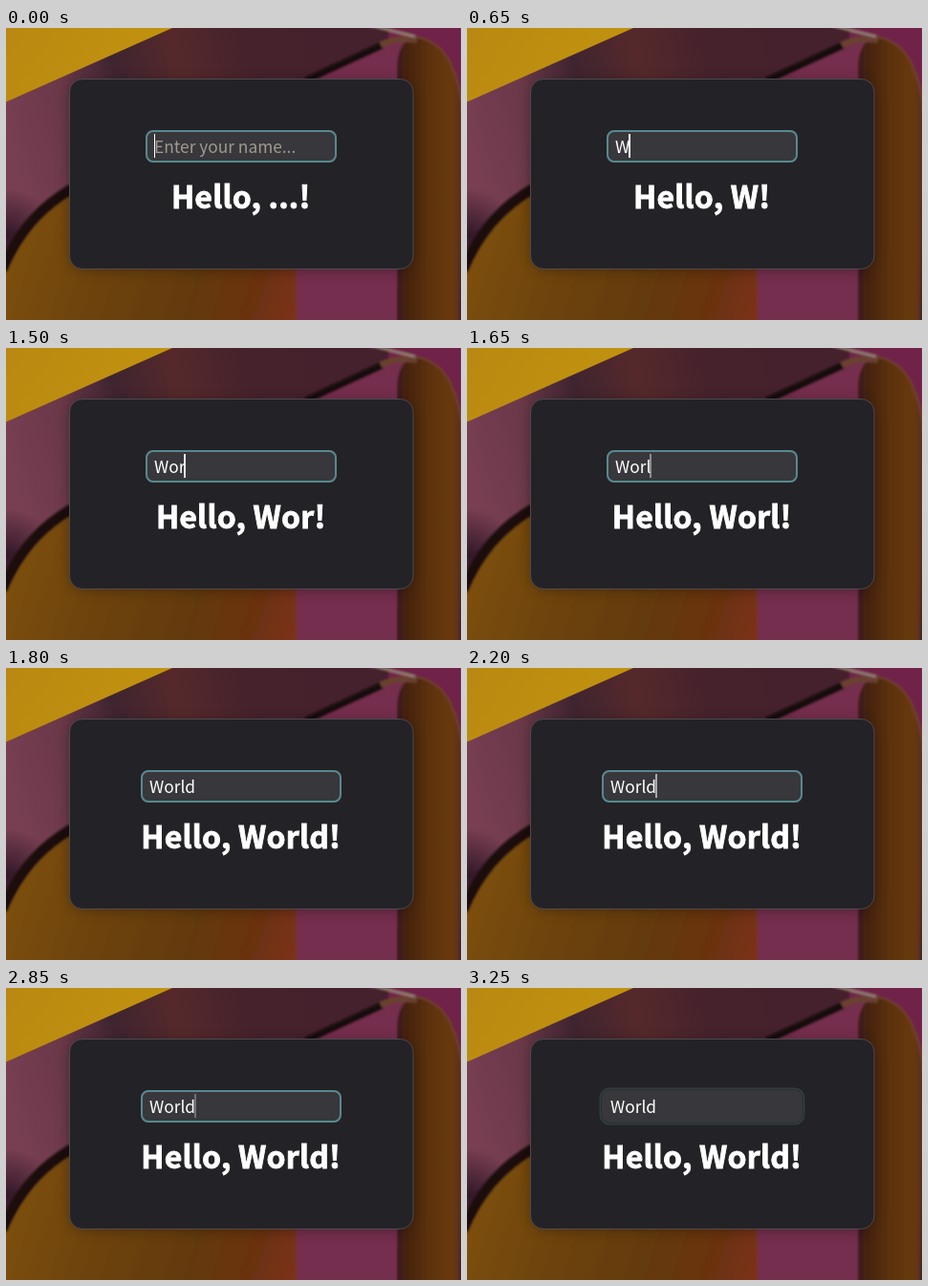
Animation, 476 px wide and 306 px high, one loop 3300 ms. Source, as an HTML page:

```html
<!DOCTYPE html>
<html lang="en">
<head>
<meta charset="utf-8">
<title>Greeting</title>
<style>
  html, body { margin: 0; width: 100%; height: 100%; overflow: hidden; background: #4a2430; }
  svg { display: block; width: 476px; height: 306px; }
  text { font-family: "Noto Sans CJK SC", "Noto Sans CJK JP", "Noto Sans CJK", "Open Sans", sans-serif; white-space: pre; }
  #entry { font-size: 17.33px; }
  #greeting { font-size: 32px; font-weight: 700; letter-spacing: .2px; text-anchor: middle; fill: #fff; stroke: #fff; stroke-width: .9px; }
</style>
</head>
<body>
<svg viewBox="0 0 476 306">
  <defs>
    <linearGradient id="mauve" gradientUnits="userSpaceOnUse" x1="0" y1="110" x2="340" y2="20">
      <stop offset="0" stop-color="#783f52"/>
      <stop offset=".2" stop-color="#6a3848"/>
      <stop offset=".36" stop-color="#3f2430"/>
      <stop offset=".55" stop-color="#55292b"/>
      <stop offset=".75" stop-color="#46222c"/>
      <stop offset="1" stop-color="#44212c"/>
    </linearGradient>
    <linearGradient id="gold" x1="0" y1="0" x2="1" y2=".3">
      <stop offset="0" stop-color="#b98811"/>
      <stop offset="1" stop-color="#c2930f"/>
    </linearGradient>
    <linearGradient id="amber" gradientUnits="userSpaceOnUse" x1="0" y1="190" x2="304" y2="290">
      <stop offset="0" stop-color="#7f520f"/>
      <stop offset=".3" stop-color="#70450e"/>
      <stop offset=".65" stop-color="#643a0f"/>
      <stop offset=".85" stop-color="#693310"/>
      <stop offset="1" stop-color="#7b3018"/>
    </linearGradient>
    <linearGradient id="pillar" gradientUnits="userSpaceOnUse" x1="409" y1="0" x2="476" y2="0">
      <stop offset="0" stop-color="#3c1a22"/>
      <stop offset=".15" stop-color="#46230f"/>
      <stop offset=".5" stop-color="#5c320d"/>
      <stop offset=".85" stop-color="#683a10"/>
      <stop offset="1" stop-color="#5c3018"/>
    </linearGradient>
    <radialGradient id="dusk" gradientUnits="userSpaceOnUse" cx="2" cy="218" r="50">
      <stop offset="0" stop-color="#24101f" stop-opacity=".85"/>
      <stop offset="1" stop-color="#24101f" stop-opacity="0"/>
    </radialGradient>
    <filter id="soft" x="-20%" y="-20%" width="140%" height="140%"><feGaussianBlur stdDeviation="1"/></filter>
    <filter id="shadow" x="-20%" y="-30%" width="140%" height="160%"><feGaussianBlur stdDeviation="8"/></filter>
    <clipPath id="field"><rect id="fieldArea" y="107" height="34"/></clipPath>
  </defs>

  <rect width="476" height="306" fill="url(#mauve)"/>
  <rect y="160" width="70" height="110" fill="url(#dusk)"/>
  <g filter="url(#soft)">
    <path d="M400 -4H480V120H400Z" fill="#6f2449"/>
    <path d="M314 58L392 20L416 14V310H300V60Z" fill="#742d4d"/>
    <path d="M409 310V40Q410 14 428 9Q452 12 464 35Q474 56 478 90L474 310Z" fill="url(#pillar)"/>
    <path d="M314 55L394 18" fill="none" stroke="#17090f" stroke-width="7"/>
    <path d="M392 18Q408 10 430 12" fill="none" stroke="#6b4030" stroke-width="7"/>
    <path d="M380 -3L428 9" fill="none" stroke="#907a70" stroke-width="3"/>
    <path d="M428 9Q454 14 465 37T478 90" fill="none" stroke="#70402c" stroke-width="2"/>
    <path d="M-4 264Q20 200 70 170H304V310H-4Z" fill="url(#amber)"/>
    <path d="M-4 254Q19 197 70 168" fill="none" stroke="#1d0c11" stroke-width="11"/>
  </g>
  <path d="M0 0H174L0 77.5Z" fill="url(#gold)"/>

  <rect x="68" y="58" width="356" height="194" rx="14" fill="#000" opacity=".4" filter="url(#shadow)"/>
  <rect x="66.5" y="53.5" width="359.5" height="199" rx="13.5" fill="#232226" stroke="#504a4e"/>

  <rect id="box" y="107" height="34" rx="8" fill="#38373b"/>
  <rect id="ring" fill="none" stroke="#578990" stroke-width="2"/>
  <text id="entry" y="131"></text>
  <rect id="caret" y="111" width="2" height="25" fill="#fff" clip-path="url(#field)"/>
  <text id="greeting" x="245.7" y="189"></text>
</svg>
<script>
const LOOP = 3300, STEP = 50, MID = 246;
const HINT = 'Enter your name...';
const KEYS = [[650, 'W'], [1100, 'Wo'], [1250, 'Wor'], [1600, 'Worl'], [1750, 'World']];
const el = id => document.getElementById(id);
const [box, ring, entry, caret, greeting, fieldArea] =
  ['box', 'ring', 'entry', 'caret', 'greeting', 'fieldArea'].map(el);

function set(node, attrs) {
  for (const name in attrs) node.setAttribute(name, attrs[name]);
}

const ramp = (t, start, span) => Math.min(1, Math.max(0, (t - start) / span));

function caretAlpha(t) {
  if (t < 650) return 1 - ramp(t, 100, 350);
  if (t < 2000) return 1 - ramp(t, 1450, 350);
  return ramp(t, 2000, 350) - ramp(t, 2600, 350);
}

function draw(t) {
  const word = KEYS.reduce((now, [at, text]) => t >= at ? text : now, '');
  const width = word === 'World' ? 210 : 200;
  const left = MID - width / 2;
  const start = left + 9;

  greeting.textContent = `Hello, ${word || '...'}!`;
  entry.textContent = word || HINT;
  set(entry, { x: start, fill: word ? '#fff' : '#a09a8f' });
  set(box, { x: left, width });

  // The focus ring grows outward as it fades.
  const blur = ramp(t, 3100, 200);
  const grow = 3.3 * blur - 1;
  set(ring, {
    x: left - grow, y: 107 - grow,
    width: width + 2 * grow, height: 34 + 2 * grow,
    rx: 8 + grow, opacity: 1 - blur
  });

  const end = start + (word ? entry.getComputedTextLength() : 0);
  set(fieldArea, { x: start, width: width - 18 });
  set(caret, { x: Math.round(end) - 1, opacity: caretAlpha(t) });
}

function frame() {
  const t = performance.now() % LOOP;
  draw(Math.floor(t / STEP) * STEP);
  requestAnimationFrame(frame);
}
frame();
</script>
</body>
</html>
```
